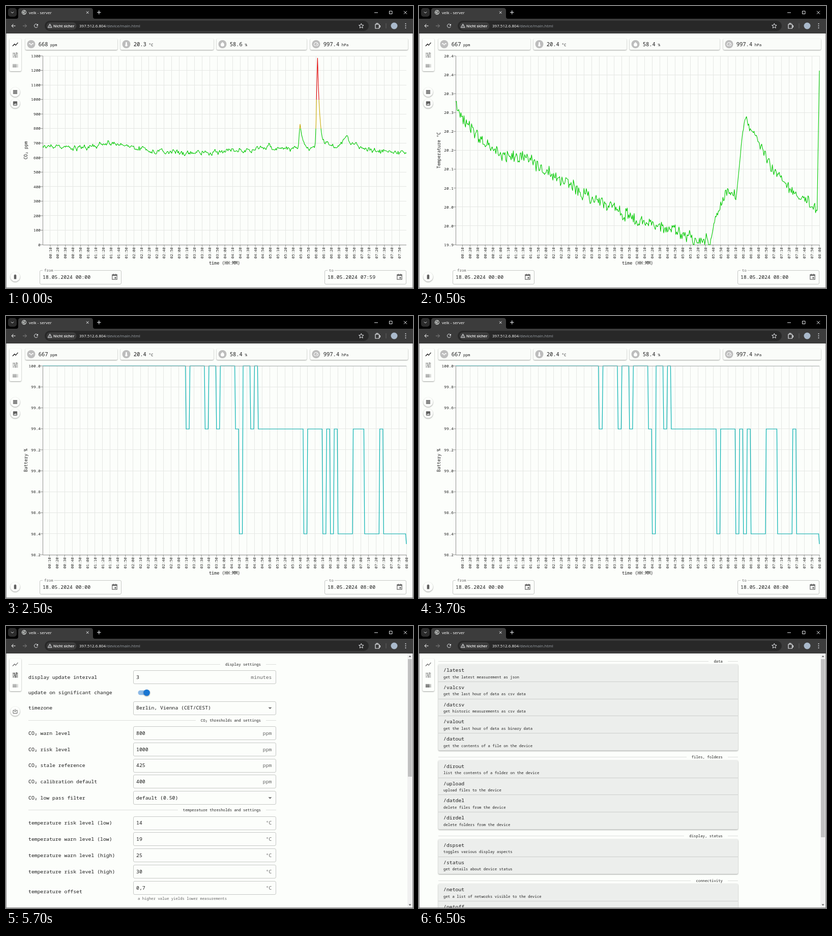
Write an HTML page that moves like this. It is 800 by 554 pixels and loops after 8 s.

```html
<!DOCTYPE html>
<html lang="en">
<head>
<meta charset="utf-8">
<title>velk - server</title>
<style>
html, body { margin: 0; width: 100%; height: 100%; overflow: hidden; background: #fcfefb; }
svg { display: block; width: 100vw; height: 100vh; }
text { font-family: "Noto Sans Mono", "DejaVu Sans Mono", monospace; white-space: pre; }
text.ui { font-family: "Open Sans", "Noto Sans", sans-serif; font-weight: 500; }
.card { filter: drop-shadow(0 1px 1px rgba(0, 0, 0, .38)); }
.crisp { shape-rendering: crispEdges; }
.scene { visibility: hidden; animation: 8s step-end infinite; }
#co2 { animation-name: co2; }
#temp { animation-name: temp; }
#batt { animation-name: batt; }
#settings { animation-name: settings; }
#api { animation-name: api; }
@keyframes co2 { 0% { visibility: visible } 6.25%, 100% { visibility: hidden } }
@keyframes temp { 0% { visibility: hidden } 6.25% { visibility: visible } 31.25%, 100% { visibility: hidden } }
@keyframes batt { 0% { visibility: hidden } 31.25% { visibility: visible } 56.25%, 100% { visibility: hidden } }
@keyframes settings { 0% { visibility: hidden } 56.25% { visibility: visible } 81.25%, 100% { visibility: hidden } }
@keyframes api { 0% { visibility: hidden } 81.25%, 100% { visibility: visible } }
</style>
</head>
<body>
<svg id="stage" viewBox="0 0 800 554" preserveAspectRatio="none"></svg>
<script>
const range = (n, f) => Array.from({ length: n }, (_, i) => f(i));
const text = (x, y, s, size, fill = '#1c1c1c', attrs = '') =>
  `<text x="${x}" y="${y}" font-size="${size}" fill="${fill}" ${attrs}>${s}</text>`;
const ui = (x, y, s, size, fill, attrs = '') => text(x, y, s, size, fill, `class="ui" ${attrs}`);
const path = (d, stroke, w = 1, attrs = '') =>
  `<path d="${d}" fill="none" stroke="${stroke}" stroke-width="${w}" ${attrs}/>`;
const shape = (d, fill) => `<path d="${d}" fill="${fill}"/>`;
const rect = (x, y, w, h, fill, r = 0, attrs = '') =>
  `<rect x="${x}" y="${y}" width="${w}" height="${h}" rx="${r}" fill="${fill}" ${attrs}/>`;
const disc = (x, y, r, fill, attrs = '') => `<circle cx="${x}" cy="${y}" r="${r}" fill="${fill}" ${attrs}/>`;
const rule = (x1, x2, y) => rect(x1, y, x2 - x1, 1, '#dcdedc', 0, 'class="crisp"');
const scene = (id, body) => `<g id="${id}" class="scene">${body}</g>`;
const end = 'text-anchor="end"', mid = 'text-anchor="middle"', card = 'class="card"';

// Icons sit on a 24 unit grid.
const icons = {
  chart: c => path('M3 18l6.500-7 4 4L21 6', c, 2.2),
  tune: c => path('M3 6h10m4 0h4M3 12h4m4 0h10M3 18h6m4 0h8M16 3v6M10 9v6M12 15v6', c, 2),
  toc: c => path('M3 8h14m2 0h2M3 12h14m2 0h2M3 16h14m2 0h2', c, 2),
  rows: c => path('M3 6h18M3 12h18M3 18h18', c, 4),
  image: c => rect(3, 3, 18, 18, c, 2) + shape('M5 18l3.500-4.500 2.500 3 3.500-4.500 4.500 6z', '#fff'),
  battery: c => rect(7, 4, 10, 18, c, 1.5) + rect(10, 2, 4, 3, c),
  save: c => path('M8 8H4v12h16V8h-4M12 3v10M8 10l4 4 4-4', c, 2),
  event: c => path('M4 4h16v16H4zM8 1v4M16 1v4', c, 2) + rect(4, 4, 16, 4, c) + rect(12, 12, 5, 5, c),
  thermo: c => disc(12, 17, 5, c) + rect(9, 2, 6, 14, c, 3),
  drop: c => shape('M12 2Q4 9 4 14a8 8 0 0 0 16 0Q20 9 12 2z', c),
  globe: c => path('M12 3a9 9 0 1 0 .01 0zM4 9l6 6v5M19 18h-4v-5H8v-2h3V8h4V4', c, 2.5),
  back: c => path('M20 12H5M12 5l-7 7 7 7', c, 2),
  reload: c => path('M18 8a7 7 0 1 0 .8 6', c, 2) + shape('M20 4v7h-7z', c),
  wave: c => path('M2 12q4-7 7 0t6 0t7 0', c, 3),
  gauge: c => path('M5 19a9 9 0 1 1 14 0zM12 14l5-5', c, 2.5)
};
const icon = (name, x, y, size, fill) =>
  `<g transform="translate(${x - size / 2} ${y - size / 2}) scale(${size / 24})">${icons[name](fill)}</g>`;

function star(x, y, r) {
  const points = range(10, i => {
    const a = i * Math.PI / 5, k = i % 2 ? r * .45 : r;
    return `${x + k * Math.sin(a)} ${y - k * Math.cos(a)}`;
  });
  return path(`M${points.join('L')}z`, '#e8eaed', 1, 'stroke-linejoin="round"');
}

function browser() {
  const w = '#e8eaed';
  return rect(0, 0, 800, 25, '#000') + rect(0, 25, 800, 29, '#3c3c3c') +
    rect(4, 4, 17, 17, '#2c2c2c', 5) + path('M10 11.5l2.5 2.5 2.5-2.5', w) +
    shape('M20 25q4 0 4-4V9q0-5 5-5h137q5 0 5 5v12q0 4 4 4z', '#3c3c3c') +
    icon('globe', 35.5, 12.5, 11, '#c4c7c5') + ui(45, 15.5, 'velk - server', 8, '#fff') +
    path('M158 10.5l4.5 4.5m0-4.5l-4.5 4.5', w) + path('M179 12.5h7.5M182.75 8.75v7.5', w, 1.2) +
    path('M724 13h7M753.5 10h5.5v5.5h-5.5zM782 9.8l6 6m0-6l-6 6', w) +
    icon('back', 14.5, 39, 12, '#fff') +
    `<g transform="rotate(180 37 39)">${icon('back', 37, 39, 12, '#858585')}</g>` +
    icon('reload', 59, 39, 12, w) +
    rect(76, 29, 637, 20, '#282828', 10) + rect(79.5, 32, 59, 14.5, '#3c3c3c', 7.2) +
    path('M86.3 35.2l3.9 7h-7.8zM86.3 37.6v2m0 .7v1', w, 1, 'stroke-linejoin="round"') +
    ui(93, 42, 'Nicht sicher', 7.2, '#fff', 'style="font-weight:600"') +
    ui(144, 42.3, '397.512.6.804<tspan fill="#9aa0a6" font-weight="400">/device/main.html</tspan>', 8, '#fff') +
    star(698.3, 39.3, 5) + path('M726 36h7.500v8H726zM728 36v-2h3v2M733.500 38.500h2v3h-2', w, 1.2) +
    rect(746.5, 34, 1, 10, '#606060') + disc(763, 39, 6.5, '#a9b9cb') +
    range(3, i => disc(785.5, 35 + i * 4, 1, w)).join('');
}

function nav(active) {
  return rect(7, 64, 23, 64, '#fdfffc', 2.5, card) + ['chart', 'tune', 'toc'].map((n, i) =>
    icon(n, 18.2, 75.3 + i * 21, 14, i === active ? '#1c1c1c' : '#757575')).join('');
}

const button = (name, y, size) => disc(18, y, 9.3, '#fdfffc', card) + icon(name, 18, y, size, '#606060');

function reading(x, w, glyph, value, unit) {
  return rect(x, 64, w, 22, '#fafcf9', 2.5, card) + disc(x + 11.5, 75, 8, '#bdbdbd') +
    icon(glyph, x + 11.5, 75, 10.5, '#fff') +
    text(x + 25.7, 79, `${value}<tspan font-size="7.5"> ${unit}</tspan>`, 10.5);
}

const readings = (co2, temp, humidity) =>
  reading(38, 181, 'wave', co2, 'ppm') + reading(225, 183, 'thermo', temp, '°C') +
  reading(414, 177, 'drop', humidity, '%') + reading(598, 192, 'gauge', '997.4', 'hPa');

const outline = (x, y, w, h) => rect(x + .5, y + .5, w - 1, h - 1, 'none', 2.5, 'stroke="#c6c8c6"');

function dateField(x, label, time) {
  return outline(x, 519, 161, 28) + rect(x + 6, 518, label.length * 4.4 + 5, 3, '#fcfefb') +
    text(x + 9, 522, label, 7.3, '#666') + text(x + 6, 536.3, `18.05.2024 ${time}`, 9.8) +
    icon('event', x + 147.5, 532.5, 14, '#666');
}

const L = 72, R = 787, T = 98, B = 469, STEP = (R - L) / 479;
const clock = m => [m / 60, m % 60].map(n => String(Math.floor(n)).padStart(2, '0')).join(':');

// first: minute of the day at the left edge
function axes(first, labels, title) {
  let grid = '', ticks = '', names = '';
  for (let m = 10; m <= first + 479; m += 10) {
    const x = L + (m - first) * STEP;
    grid += `M${x} ${T}V${B}`;
    ticks += `M${x} ${B}v4`;
    names += text(0, 0, clock(m), 7.4, '#222', `${end} transform="translate(${x + 2.6} 474) rotate(-90)"`);
  }
  labels.forEach((s, i) => {
    const y = T + i * (B - T) / (labels.length - 1);
    grid += `M${L} ${y}H${R}`;
    ticks += `M${L} ${y}h-4`;
    names += text(68, y + 2.8, s, 7.8, '#222', end);
  });
  return path(grid, '#000', 1, 'opacity=".09" class="crisp"') +
    path(`M72.5 98V469.5H787${ticks}`, '#777', .8) + names +
    text(429.5, 507.5, 'time (HH:MM)', 8.5, '#1c1c1c', mid) +
    text(0, 0, title, 8.5, '#1c1c1c', `${mid} transform="translate(42 283.5) rotate(-90)"`);
}

function random(seed) {
  return () => (seed = (seed * 16807) % 2147483647) / 2147483647;
}

function between(points, t) {
  const k = Math.max(1, points.findIndex(p => p[0] >= t));
  const [[t0, v0], [t1, v1]] = points.slice(k - 1, k + 1);
  return v0 + (v1 - v0) * (t - t0) / (t1 - t0);
}

// Minute by minute line with seeded jitter, calm where it is steep.
function noisy(height, amp, keep, seed) {
  const rnd = random(seed);
  let drift = 0;
  return 'M' + range(480, i => {
    const slope = i < 479 ? height(i + 1) - height(i) : 99;
    drift = drift * keep + (rnd() + rnd() - 1) * amp;
    const y = height(i) + drift / (1 + slope * slope * .02);
    return `${(L + i * STEP).toFixed(1)} ${Math.min(B, y).toFixed(1)}`;
  }).join('L');
}

// Quick rise to the peak, then a slow decay.
const peak = (t, at, high, rise, decay) =>
  high * Math.exp(t < at ? -(((t - at) / rise) ** 2) : (at - t) / decay);

function co2(t) {
  const ppm = between([[0, 675], [60, 665], [84, 703], [140, 650], [215, 630], [250, 650], [370, 668], [479, 630]], t) +
    peak(t, 299, 28, 5, 3) + peak(t, 339, 165, 1.5, 4) + peak(t, 362, 617, 1.75, 3) +
    peak(t, 374, 35, 3, 6) + peak(t, 401, 82, 8, 11);
  return B - ppm / 1300 * (B - T);
}

const temperature = t => between([[0, 195], [20, 244], [57, 292], [92, 298], [140, 342], [185, 383], [250, 425],
  [335, 465], [342, 420], [355, 370], [370, 368], [377, 262], [381, 222], [390, 240], [415, 315],
  [440, 360], [476, 402], [479, 127]], t);

// Level and number of five minute slots, from 03:10 on.
function battery() {
  const level = { H: 98, M: 222, L: 428 };
  let x = L + 189 * STEP, d = `M${L} ${T}`;
  for (const run of 'M H4 M H2 M H4 M L H2 M H M12 L M4 L M L M L4 M3 L4 M L6'.split(' ')) {
    d += `H${x - STEP}L${x} ${level[run[0]]}`;
    x += 5 * STEP * (run.slice(1) || 1);
  }
  return `${d}H${R - STEP}L${R} 448`;
}

function chart(id, values, first, labels, title, curve) {
  return scene(id, nav(0) + button('rows', 169, 11) + button('image', 191.3, 11) + button('battery', 532, 11) +
    readings(...values) + axes(first, labels, title) + curve +
    dateField(66, 'from', '00:00') + dateField(626, 'to', clock(first + 479)));
}

function scrollbar(bottom) {
  return rect(789, 54, 10, 499, '#f1f1f1') + rect(790, 65, 8, bottom - 65, '#c1c1c1') +
    shape('M791.5 61h5l-2.5-3zM791.5 546.5h5l-2.5 3z', '#606060');
}

function header(x1, x2, y, s) {
  const right = x2 - 30, left = right - s.length * 4.38;
  return rule(x1, left - 10, y) + rule(right + 9.5, x2, y) + text(right, y + 3, s, 7.3, '#222', end);
}

function field(y, label, value, unit, labelY = y) {
  return outline(250, Math.round(y - 13.5), 281, 27) + text(44, labelY + 3.2, label, 9.8) + text(256, y + 3.2, value, 9.8) +
    (unit ? text(522.5, y + 3.2, unit, 9.8, '#666', end) : shape(`M515.5 ${y - 1.2}h7l-3.5 3.5z`, '#707070'));
}

function settings() {
  const pitch = 31.8;
  const air = [['warn level', 800], ['risk level', 1000], ['stale reference', 425], ['calibration default', 400]];
  const limits = [['risk level (low)', 14], ['warn level (low)', 19], ['warn level (high)', 25], ['risk level (high)', 30]];
  return scene('settings', nav(1) + button('save', 167.5, 12) +
    header(44, 531, 75, 'display settings') +
    field(100.5, 'display update interval', 3, 'minutes') +
    text(44, 134, 'update on significant change', 9.8) +
    rect(259.5, 126.5, 21, 9, '#8cb9e6', 4.5) + disc(276.6, 131, 6.3, '#1976d2', card) +
    field(161, 'timezone', 'Berlin, Vienna (CET/CEST)') +
    header(44, 531, 185, 'CO₂ thresholds and settings') +
    air.map(([s, v], i) => field(210.5 + i * pitch, `CO₂ ${s}`, v, 'ppm')).join('') +
    field(337.5, 'CO₂ low pass filter', 'default (0.50)') +
    header(44, 531, 361, 'temperature thresholds and settings') +
    limits.map(([s, v], i) => field(387 + i * pitch, `temperature ${s}`, v, '°C')).join('') +
    field(514.3, 'temperature offset', '0,7', '°C', 521.3) +
    text(259, 538, 'a higher value yields lower measurements', 7.3, '#666') + scrollbar(296));
}

function api() {
  const groups = [
    ['data', ['/latest', 'get the latest measurement as json'], ['/valcsv', 'get the last hour of data as csv data'],
      ['/datcsv', 'get historic measurements as csv data'], ['/valout', 'get the last hour of data as binary data'],
      ['/datout', 'get the contents of a file on the device']],
    ['files, folders', ['/dirout', 'list the contents of a folder on the device'], ['/upload', 'upload files to the device'],
      ['/datdel', 'delete files from the device'], ['/dirdel', 'delete folders from the device']],
    ['display, status', ['/dspset', 'toggles various display aspects'], ['/status', 'get details about device status']],
    ['connectivity', ['/netout', 'get a list of networks visible to the device'], ['/netoff', '']]
  ];
  const pitch = 33.75;
  let y = 75, body = '';
  for (const [title, ...rows] of groups) {
    body += header(38, 627, Math.round(y - 6.5), title) + rect(38, y, 589, rows.length * pitch + .8, '#eceeec', 2.5, card);
    rows.forEach(([name, info], i) => {
      if (i) body += rect(38, Math.round(y), 589, 1, '#cdcfcd');
      body += text(48, y + 15.2, name, 9.8) + text(48, y + 27.7, info, 7.3, '#222');
      y += pitch;
    });
    y += 20;
  }
  return scene('api', nav(2) + body + scrollbar(415));
}

const levels = `<linearGradient id="levels" gradientUnits="userSpaceOnUse" x1="0" y1="${T}" x2="0" y2="${B}">` +
  [['#e00000', 1300, 1000], ['#c9a800', 1000, 800], ['#00c800', 800, 0]].map(([c, ...ppm]) =>
    ppm.map(p => `<stop offset="${1 - p / 1300}" stop-color="${c}"/>`).join('')).join('') + '</linearGradient>';
const later = ['667', '20.4', '58.4'];

document.getElementById('stage').innerHTML = levels + rect(0, 54, 800, 500, '#fcfefb') +
  chart('co2', ['668', '20.3', '58.6'], 0, range(14, i => 1300 - i * 100), 'CO₂ ppm',
    path(noisy(co2, 6, .4, 4211), 'url(#levels)', 1.1, 'stroke-linejoin="round"')) +
  chart('temp', later, 1, range(11, i => (20.43 - i * .05 + (i > 9 ? -.03 : 0)).toFixed(1)), 'Temperature °C',
    path(noisy(temperature, 16, .1, 977), '#00c800', 1.1, 'stroke-linejoin="round"')) +
  chart('batt', later, 1, range(10, i => (100 - i * .2).toFixed(1)), 'Battery %',
    path(battery(), '#00b0b0', 1.2) + path(`M${L} 98.3H${R}`, '#a3a9a9')) +
  settings() + api() + browser() +
  path('M.5 54V553.5H799.5V54', '#858585', 1, 'class="crisp"');
</script>
</body>
</html>
```
